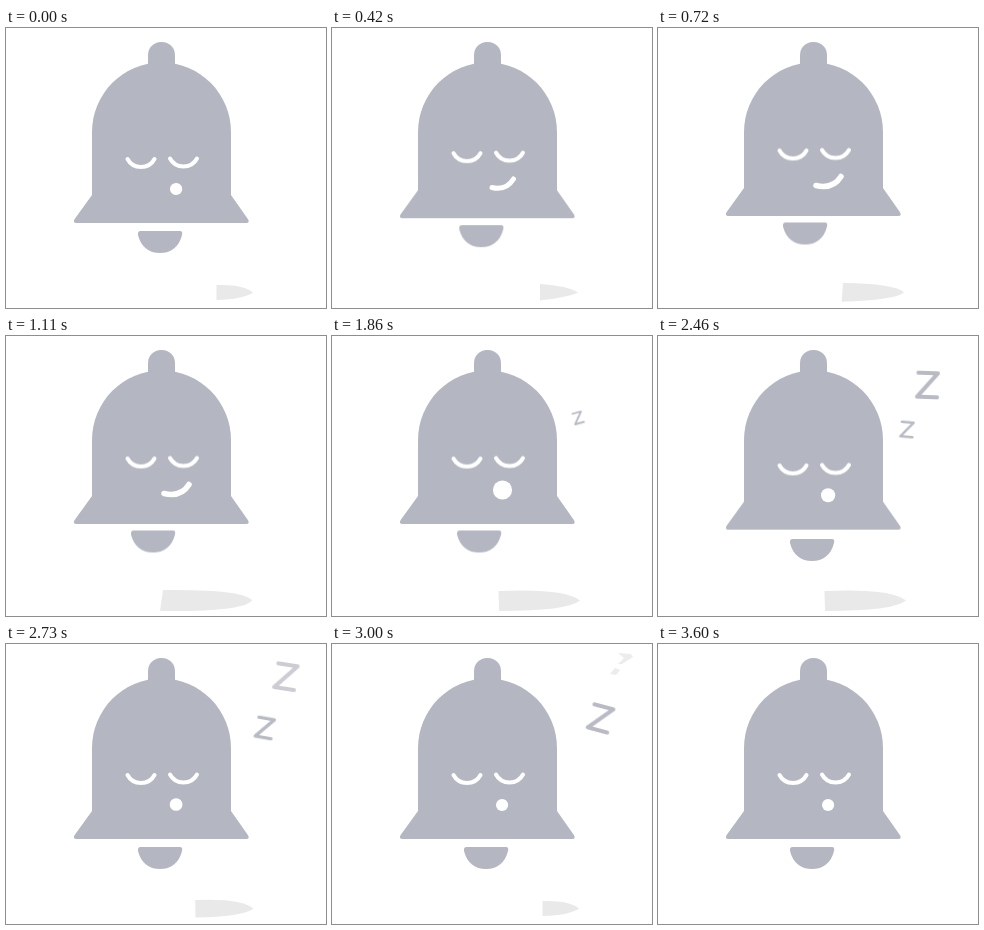
An HTML page without scripts that plays this animation: 320 px wide and 280 px high, repeating every 3.63 s.

```html
<!DOCTYPE html>
<html lang="en">
<head>
<meta charset="utf-8">
<title>Sleeping bell</title>
<style>
  html, body { margin: 0; width: 100%; height: 100%; overflow: hidden; background: #fff; }
  svg { display: block; width: 320px; height: 280px; }

  svg * { animation: 3630ms linear infinite; }
  .bell { fill: #b4b7c1; }
  .line { fill: none; stroke: #fff; stroke-width: 4; stroke-linecap: round; }

  .breath {
    animation-name: breath;
    animation-timing-function: ease-in-out;
  }
  .skirt { --lift: 0px, -7px; }
  .eyes { --lift: 0px, -8.5px; }
  @keyframes breath {
    0%, 75%, 100% { transform: translate(0px, 0px); }
    19%, 51.2% { transform: translate(var(--lift)); }
  }

  .clapper { animation-name: swing; animation-timing-function: ease-in-out; }
  @keyframes swing {
    0%, 67.5%, 100% { transform: translate(0px, 0px); }
    19%, 51.2% { transform: translate(-7px, -8.5px); }
  }

  /* The open mouth is a near-zero-length stroke with round caps. */
  .mouth { animation-name: mouth; }
  @keyframes mouth {
    0%, 78%, 100% { d: path("M170 161Q170.1 161 170.2 161"); stroke-width: 12px; }
    8% { d: path("M162 160Q173 162 180 154"); stroke-width: 5.5px; }
    11.6% { d: path("M160 159.5Q174 163 181.5 151"); stroke-width: 5px; }
    19%, 44.5% { d: path("M158 157.5Q175 161.5 183 148.5"); stroke-width: 5.5px; }
    48% { d: path("M170.3 154Q170.4 154 170.5 154"); stroke-width: 16px; }
    51.2% { d: path("M170.4 154Q170.5 154 170.6 154"); stroke-width: 19px; }
    67.8% { d: path("M170 159.3Q170.1 159.3 170.2 159.3"); stroke-width: 14px; }
  }

  .shadow { fill: #e9e9e9; animation-name: shadow, blink; }
  @keyframes shadow {
    0%, 82%, 100% { d: path("M210.5 257Q237 256 247 264.5Q237 271.5 210.5 272Z"); }
    11.6%, 14% { d: path("M208 256Q236 258 246 264.5Q237 269 208 272.5Z"); }
    27%, 31% { d: path("M157 254Q238 253 246 264.5Q237 276 154 275Z"); }
    40%, 68% { d: path("M166.5 255Q233 252 248 264.5Q235 275 167 275Z"); }
  }
  @keyframes blink {
    0%, 98.8% { opacity: 1; }
    98.9%, 100% { opacity: 0; }
  }

  .z { fill: none; stroke: #b9bbc4; stroke-width: 4.2; stroke-linecap: round; stroke-linejoin: round; opacity: 0; }
  .first { animation-name: first; }
  @keyframes first {
    0%, 46% { opacity: 0; transform: translate(241px, 91px) rotate(-20deg) scale(.2); }
    51.2% { opacity: 1; transform: translate(246px, 82px) rotate(-16deg) scale(.45); }
    67.8% { opacity: 1; transform: translate(269.5px, 49px) rotate(2deg) scale(1); }
    74% { opacity: .9; }
    81%, 100% { opacity: 0; transform: translate(288px, 20px) rotate(14deg) scale(1); }
  }
  .second { animation-name: second; }
  @keyframes second {
    0%, 61% { opacity: 0; transform: translate(243px, 105px) rotate(-10deg) scale(.25); }
    67.8% { opacity: 1; transform: translate(249px, 93.5px) rotate(5deg) scale(.6); }
    82.6% { opacity: 1; transform: translate(268.5px, 74.5px) rotate(15deg) scale(1); }
    88% { opacity: .9; }
    96%, 100% { opacity: 0; transform: translate(279px, 50px) rotate(15deg) scale(1); }
  }

  .wisps { fill: #ececec; opacity: 0; animation-name: wisps; }
  @keyframes wisps {
    0%, 79.9% { opacity: 0; }
    80%, 88% { opacity: 1; }
    88.1%, 100% { opacity: 0; }
  }
</style>
</head>
<body>
<svg viewBox="0 0 320 280">
  <path class="shadow" d="M210.5 257Q237 256 247 264.5Q237 271.5 210.5 272Z"/>

  <g class="bell">
    <rect x="142" y="14" width="27" height="40" rx="13"/>
    <path d="M86 104A69.5 69.5 0 0 1 225 104V160H86Z"/>
    <path class="breath skirt" d="M86 150V167L69 190.5Q66 195 71 195H240Q244.500 195 241.500 190.500L225 167V150Z"/>
    <path class="clapper" d="M134.500 203H174Q177 203 176 207C173 219 165 225 154 225S135 219 132 207Q131.500 203 134.500 203Z"/>
  </g>

  <g class="line">
    <g class="breath eyes">
      <path d="M121.500 131C127 141.500 143 141.500 148.500 131"/>
      <path d="M164 130.500C169.500 141 185.500 141 191 130.500"/>
    </g>
    <path class="mouth" d="M170 161Q170.1 161 170.2 161"/>
  </g>

  <path class="z first" d="M-9.500 -12H10L-10 12H10"/>
  <path class="z second" d="M-9.500 -12H10L-10 12H10"/>
  <path class="wisps" d="M286 9L299 10L301 13L290 20H286L292 14ZM283 24L288 26L284 31L278 30Z"/>
</svg>
</body>
</html>
```
